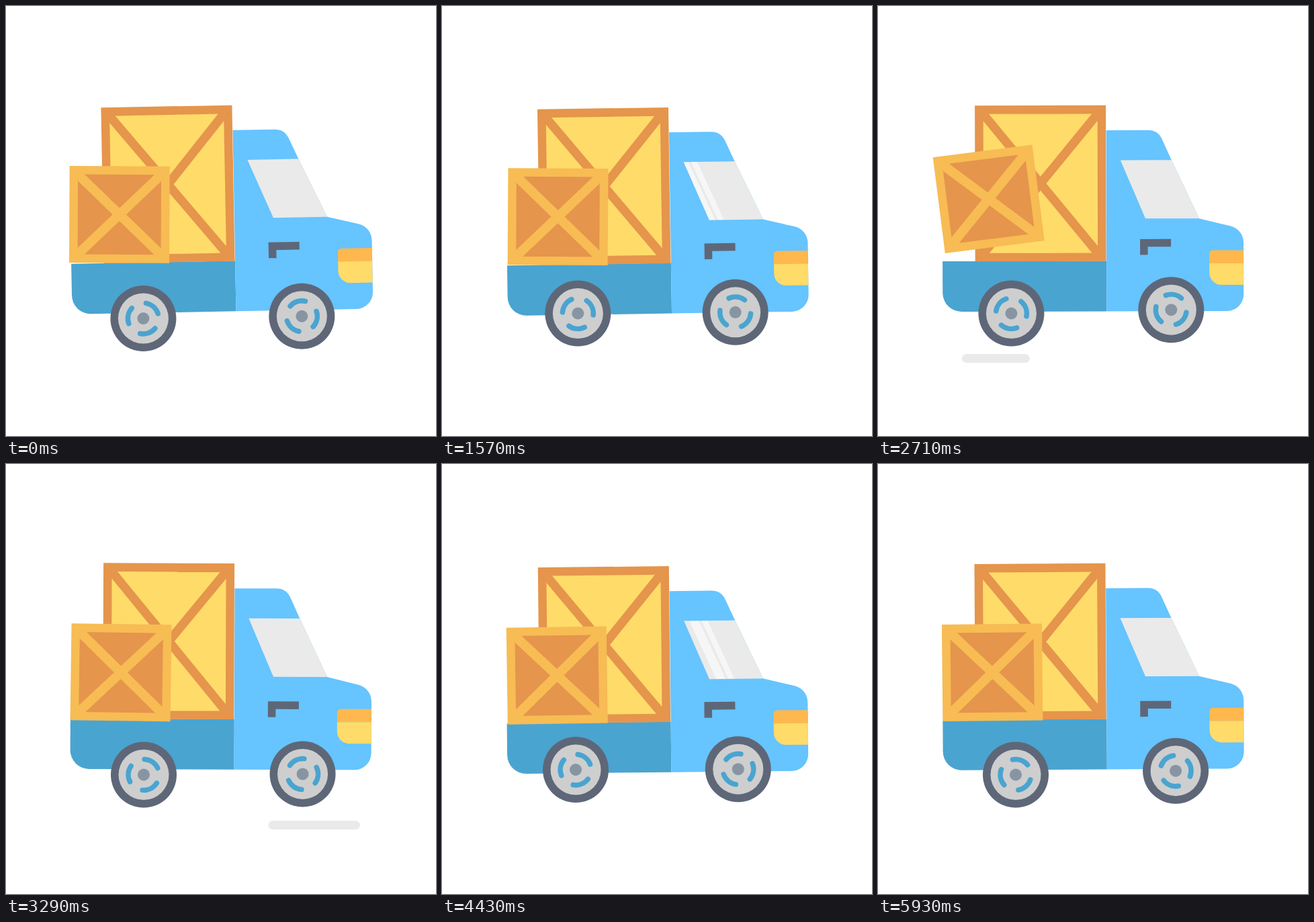
Write an HTML page that moves like this. It is 640x640 px and loops after 6000 ms.

```html
<!DOCTYPE html>
<html lang="en">
<head>
<meta charset="utf-8">
<title>Delivery truck</title>
<style>
  html, body { margin: 0; width: 100%; height: 100%; overflow: hidden; background: #fff; }
  svg { display: block; width: 100vw; height: 100vh; }
</style>
</head>
<body>
<svg viewBox="0 0 640 640">
  <defs>
    <clipPath id="pane"><path d="M361 230H437L478 317H398Z"/></clipPath>
    <g id="wheel">
      <circle r="49" fill="#5e6778"/>
      <circle r="37.5" fill="#cecece"/>
      <circle r="9" fill="#8795a3"/>
    </g>
    <path id="spoke" d="M19.7 -11.8A23 23 0 0 1 19.7 11.8" fill="none" stroke="#4aa4d0" stroke-width="7.5" stroke-linecap="round"/>
    <g id="spokes">
      <use href="#spoke"/>
      <use href="#spoke" transform="rotate(120)"/>
      <use href="#spoke" transform="rotate(240)"/>
    </g>
  </defs>

  <g stroke="#eaeaea" stroke-width="13" stroke-linecap="round">
    <path id="low"/>
    <path id="high"/>
  </g>

  <g id="body">
    <path d="M96 380H340V455H124A28 28 0 0 1 96 427Z" fill="#4aa4d0"/>
    <path d="M340 185.5H402C412 185.5 419 190 423 199L437 230L478 317L525 328.5C536 331.5 544 341 544 353V430A25 25 0 0 1 519 455H340Z" fill="#66c4ff"/>
    <path d="M361 230H437L478 317H398Z" fill="#eaeaea"/>
    <g clip-path="url(#pane)">
      <path id="glint" d="M0 230H14L53 317H39ZM18 230H27L66 317H57Z" fill="#fff" opacity=".6"/>
    </g>
    <path d="M544 364.5H498A5 5 0 0 0 493 369.5V384H544Z" fill="#ffb84d"/>
    <path d="M544 384H493V398A18 18 0 0 0 511 416H544Z" fill="#ffdb69"/>
    <path id="handle" d="M390 353.5H436V365H401.5V377H390Z" fill="#5e6778"/>
    <path d="M144.5 148.3H339.5V380.3H144.5Z" fill="#e5954c"/>
    <path d="M157 161H327V368H157Z" fill="#ffdb69"/>
    <path d="M157 161L327 368M327 161L157 368" stroke="#e5954c" stroke-width="13.2" stroke-linecap="square"/>
  </g>

  <g id="crate">
    <path d="M-74.5 -72H74.5V72H-74.5Z" fill="#f7bc54"/>
    <path d="M-62 -59.5H62V59.5H-62Z" fill="#e5954c"/>
    <path d="M-62 -59.5L62 59.5M62 -59.5L-62 59.5" stroke="#f7bc54" stroke-width="14"/>
  </g>

  <g id="rear"><use href="#wheel"/><use href="#spokes" class="spin"/></g>
  <g id="front"><use href="#wheel"/><use href="#spokes" class="spin"/></g>
</svg>

<script>
const LOOP = 6000, STREAK = 1290;
const $ = id => document.getElementById(id);
const move = (el, value) => el.setAttribute('transform', value);
const spins = document.querySelectorAll('.spin');

// Rounded hump of height 1 around a moment
const bump = (t, mid, reach) =>
  Math.abs(t - mid) < reach ? Math.cos((t - mid) / reach * Math.PI / 2) ** 2 : 0;

// Road line: the front end eases out, the back end catches up
function streak(el, t, y) {
  const k = t / STREAK, on = k > 0 && k < 1;
  el.style.display = on ? '' : 'none';
  if (!on) return;
  const left = 111 + 434 * (1 - k) ** 1.8 + 6.5;
  const right = 551 - 440 * k ** 1.9 - 6.5;
  el.setAttribute('d', `M${left} ${y}H${Math.max(left + .1, right)}`);
}

function draw(t) {
  const half = t % (LOOP / 2);
  // Vibration with a number of swings per loop, shifted by a phase in degrees
  const sway = (swings, phase) => Math.cos((swings * t / LOOP - phase / 360) * 2 * Math.PI);

  // The truck sinks, is thrown up, and sinks again; the small crate flies late
  const lift = 12 * bump(t, 950, 1000) - 11 * bump(t, 2420, 320) + 12.5 * bump(t, 4950, 850);
  const hop = bump(t, 2720, 360);
  const tilt = -.235 + .867 * sway(26, 200);

  move($('body'), `translate(0 ${lift - .4}) rotate(${tilt} 320 320)`);
  move($('handle'), `translate(0 ${-.56 * lift - 6 * hop})`);
  move($('glint'), `translate(${506 - half * .095} 0)`);
  move($('crate'), `translate(${171 - 5 * hop + 2.2 * sway(24, 190)} ${310.3 + lift - 23 * hop})
    rotate(${.9 * sway(24, 75) - 6.8 * hop})`);
  move($('rear'), `translate(${201.7 + 3.5 * sway(25, 320)} ${460 + 5 * sway(25, 0)})`);
  move($('front'), `translate(${439.7 + 3.5 * sway(27, 280)} ${459.5 + 7.3 * sway(17, 72)})`);
  spins.forEach((el, i) => move(el, `rotate(${71 + 61 * i + t * .54})`));
  streak($('low'), half - 40, 537.5);
  streak($('high'), half - 1620, 524.5);
}

// 14 pictures a second, each snapped up to a 40 ms grid
function tick() {
  const step = Math.floor(performance.now() % LOOP * .014 + .08) % 84;
  draw(Math.ceil(step * 25 / 14) * 40);
  requestAnimationFrame(tick);
}
tick();
</script>
</body>
</html>
```
